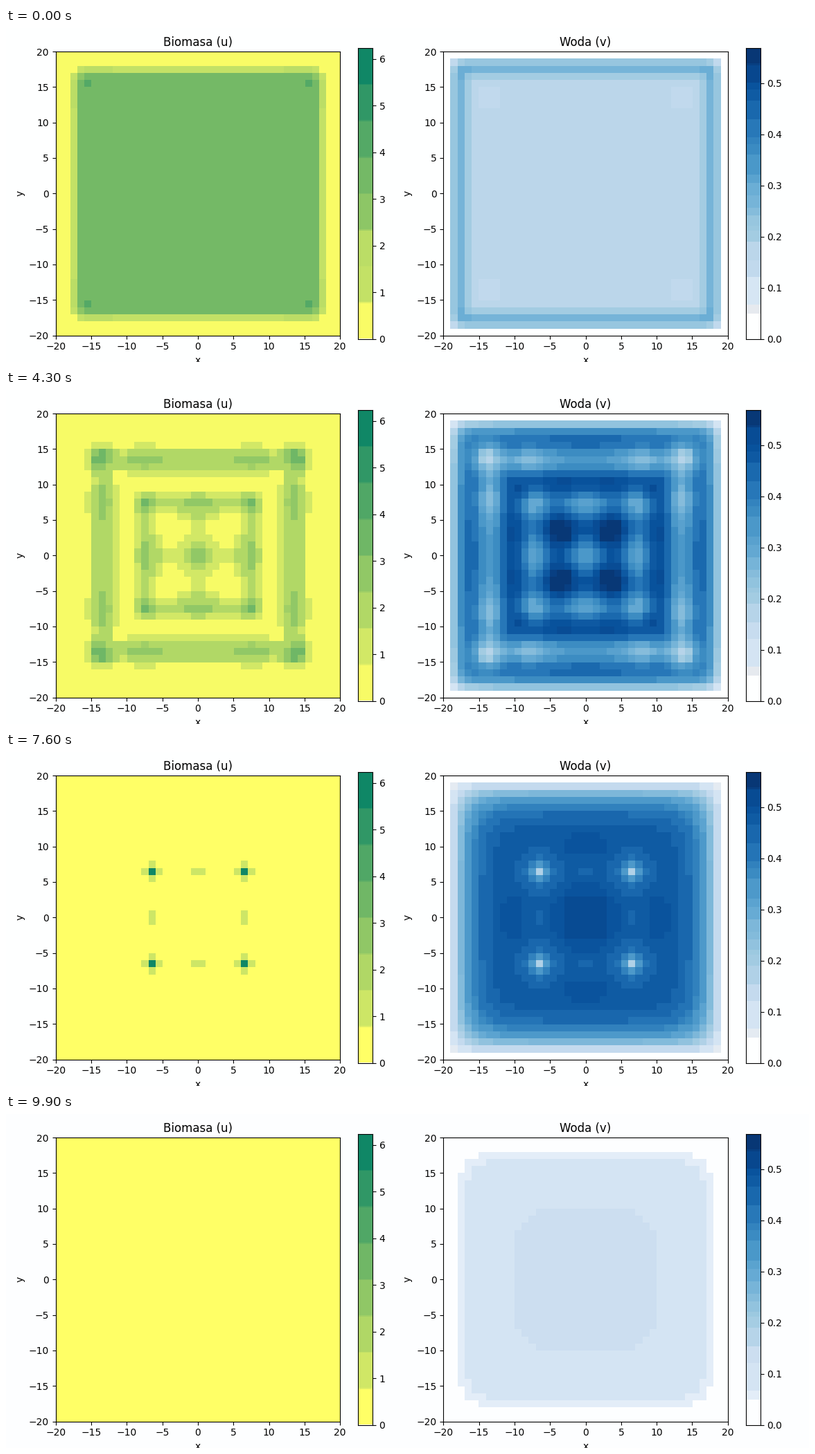
These frames come from a looping animation (1159x483 px, 10000 ms). A matplotlib script:

```python
import numpy as np
import matplotlib.pyplot as plt
from matplotlib.animation import FuncAnimation

W, H, DPI = 1159, 483, 100
FRAMES, INTERVAL = 100, 100
U_MAX, V_MAX = 6.235, 0.569
V_DIFFUSION, DT = 10.0, 2.0
SUMMER, BLUES = plt.get_cmap("summer_r"), plt.get_cmap("Blues")

# Fields are mirror symmetric, so only one quadrant of the 40 x 40 grid is computed.
r = np.arange(20) + 0.5


# ---------- biomass ----------
def bump(center, width):
    profile = np.exp(-((r - center) / width) ** 2 / 2)
    if center > 0:
        profile = profile + np.exp(-((r + center) / width) ** 2 / 2)
    return profile


def spot(x, y, amp, sx, sy):
    field = amp * np.outer(bump(y, sy), bump(x, sx))
    return field if x == y else field + field.T


def stripe(center, width, amp, end, dip=0.0):
    along = (1 - dip * bump(11, 1)) / (1 + np.exp((r - end) / 0.4))
    field = amp * np.outer(bump(center, width), along)
    return np.maximum(field, field.T)


def plateau(level, radii, factors):
    profile = np.interp(r, radii, factors)
    return level * np.outer(profile, profile)


def smooth(t):
    t = np.clip(t, 0, 1)
    return t * t * (3 - 2 * t)


def mix(a, b, t):
    return a + (b - a) * t


FLAT = plateau(3.34, [11.5, 12.5, 14.5, 15.5, 16.5, 17.5, 18.5, 19.5],
               [1, 1.03, 1.03, 1.09, 0.94, 0.455, 0.09, 0])

RIDGE = plateau(1 / 2.1,
                [4.5, 7.5, 8.5, 10.5, 11.5, 12.5, 13.5, 14.5, 15.5, 16.5, 17.5, 18.5, 19.5],
                [2.1, 2.2, 2.2, 2.02, 1.92, 2.05, 2.45, 2.65, 2.24, 0.82, 0.2, 0.04, 0])


def maze():
    near, far = np.minimum.outer(r, r), np.maximum.outer(r, r)
    cross = 0.85 * np.exp(-(near / 1.8) ** 2 / 2) * (far < 6)
    return (stripe(13.4, 1.35, 2.3, 15.2, dip=0.2) + stripe(7.4, 1.2, 1.55, 8.2) + cross
            + spot(14, 14, 1.9, 1.2, 1.2) + spot(8, 13.6, 0.8, 1.2, 1.2)
            + spot(7.4, 7.4, 1.9, 1.1, 1.1) + spot(0, 7.3, 1.1, 2, 1.2)
            + spot(0, 0, 1.9, 1.5, 1.5))


MAZE = maze()

# (x, y, height, width x, width y) when formed, the same when shrunk, time of death
SPOTS = [
    ((13.3, 13.3, 4.3, 0.95, 0.95), (12.5, 12.5, 4.5, 0.6, 0.6), 66),
    ((8.1, 13.0, 4.2, 1, 1), (7.5, 12.5, 5.1, 0.57, 0.57), 76),
    ((2.5, 13.1, 4.4, 1, 1), (2.5, 12.5, 4.4, 0.57, 0.57), 75),
    ((7, 7, 4.2, 1, 1), (6.5, 6.5, 5.9, 0.57, 0.57), 81),
    ((0, 7, 3.3, 2, 0.95), (0, 6.5, 4.0, 0.95, 0.6), 78),
    ((0, 0, 3.9, 1.25, 1.25), (0, 0, 2.6, 0.97, 0.97), 75),
]


def spots(n):
    t = min((n - 58) / 12, 1)
    total = np.zeros((20, 20))
    for first, last, death in SPOTS:
        shape = [mix(a, b, t) for a, b in zip(first, last)]
        shape[2] *= 1 - smooth((n - death + 5) / 5)
        total += spot(*shape)
    return total


def biomass(n):
    if n < 31:
        u = mix(FLAT, RIDGE, n / 31)
    elif n < 43:
        u = mix(RIDGE, MAZE, ((n - 31) / 12) ** 1.3)
    elif n < 58:
        u = mix(MAZE, spots(58), smooth((n - 43) / 14))
    else:
        u = spots(n)
    u = np.clip(u, 0, U_MAX)
    u[19] = u[:, 19] = 0
    return u


# ---------- water: diffusion, falling rain, uptake by the biomass ----------
def laplacian(size):
    line = np.diag(np.full(size, -2.0)) + np.eye(size, k=1) + np.eye(size, k=-1)
    line[0, 0] = -1
    eye = np.eye(size)
    return np.kron(line, eye) + np.kron(eye, line)


def simulate():
    spread = V_DIFFUSION * laplacian(19)
    states, v = [], None
    for n in range(FRAMES):
        u = biomass(n)
        loss = 1 + u[:19, :19].ravel() ** 2
        rain = np.full(loss.size, 2 - 0.019 * n)
        if v is not None:
            loss = loss + 1 / DT
            rain = rain + v / DT
        v = np.linalg.solve(np.diag(loss) - spread, rain)
        states.append((u, np.pad(v.reshape(19, 19), (0, 1))))
    return states


def unfold(q):
    return np.block([[q[::-1, ::-1], q[::-1]], [q[:, ::-1], q]])


STATES = simulate()


# ---------- banded colours ----------
def bucket(rgb):
    c = rgb.astype(int)
    return (c[..., 0] >> 5) << 7 | (c[..., 1] >> 4) << 3 | c[..., 2] >> 5


def band_table(layers):
    """Mean colour of each bucket, layers being (rgb array, pixels per entry)."""
    rgb = np.concatenate([a.reshape(-1, 3) for a, _ in layers]).astype(float)
    weight = np.concatenate([np.full(a.size // 3, w) for a, w in layers])
    key = bucket(rgb)
    total = np.maximum(np.bincount(key, weight, 1024), 1e-9)
    means = [np.bincount(key, weight * rgb[:, c], 1024) / total for c in range(3)]
    return (np.stack(means, axis=1) + 0.5).astype(np.uint8)


def colours(cmap, values):
    return cmap(values, bytes=True)[..., :3]


RAMP = np.linspace(0, 1, 256)[:, None]
BARS = [colours(SUMMER, RAMP), colours(BLUES, RAMP)]
PAPER = np.full((1, 3), 255, np.uint8)
INK_EDGE = np.full((1, 3), 232, np.uint8)

# ---------- layout ----------
fig = plt.figure(figsize=(W / DPI, H / DPI), dpi=DPI, facecolor="white")


def add_axes(left, top, width, height):
    return fig.add_axes([left / W, 1 - (top + height) / H, width / W, height / H])


def add_panel(left, title, v_max, ticks):
    ax = add_axes(left, 34, 410.6, 410.6)
    image = ax.imshow(np.zeros((40, 40, 3), np.uint8), origin="lower", aspect="auto",
                      extent=(-20, 20, -20, 20), interpolation="nearest")
    ax.set_xticks(range(-20, 21, 5))
    ax.set_yticks(range(-20, 21, 5))
    ax.set_title(title)
    ax.set_xlabel("x")
    ax.set_ylabel("y")

    cax = add_axes(left + 436.3, 29, 21, 420.5)
    bar = cax.imshow(np.zeros((256, 1, 3), np.uint8), origin="lower", aspect="auto",
                     extent=(0, 1, 0, v_max), interpolation="nearest")
    cax.set_xticks([])
    cax.yaxis.tick_right()
    cax.set_yticks(ticks)
    return image, bar


panels = [add_panel(71.6, "Biomasa (u)", U_MAX, np.arange(7)),
          add_panel(631.2, "Woda (v)", V_MAX, np.arange(6) / 10)]


def update(n):
    u, v = STATES[n]
    cells = [colours(SUMMER, unfold(u) / U_MAX), colours(BLUES, unfold(v) / V_MAX)]
    table = band_table([(c, 105.4) for c in cells] + [(b, 34.5) for b in BARS]
                       + [(PAPER, 200000), (INK_EDGE, 400)])
    artists = []
    for (image, bar), cell, ramp in zip(panels, cells, BARS):
        image.set_data(table[bucket(cell)])
        bar.set_data(table[bucket(ramp)])
        artists += [image, bar]
    fig.set_facecolor(table[bucket(PAPER)][0] / 255)
    return artists


anim = FuncAnimation(fig, update, frames=FRAMES, interval=INTERVAL,
                     repeat=True, repeat_delay=0, blit=False)
plt.show()
```
